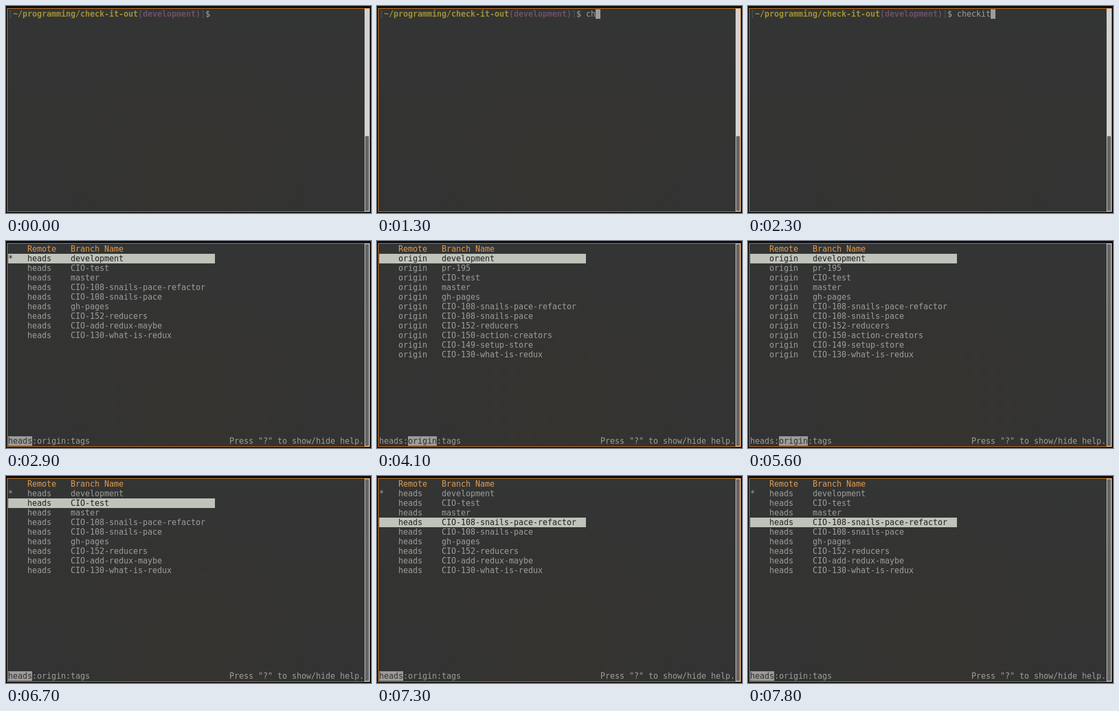
These frames come from a looping animation (683x388 px, 8 s). An HTML page with a canvas:

```html
<!DOCTYPE html>
<html lang="en">
<head>
<meta charset="utf-8">
<title>Branch picker in a terminal</title>
<style>
html, body { margin: 0; width: 100%; height: 100%; overflow: hidden; background: #0c0c0c; }
canvas { display: block; }
</style>
</head>
<body>
<canvas id="stage" width="683" height="388"></canvas>
<script>
const ctx = document.getElementById('stage').getContext('2d', { alpha: false });
const LOOP = 8000, LEFT = 4, TOP = 6, CELL = 9, ROW = 18;
const FONT = '15px "DejaVu Sans Mono", monospace';
const TEXT = '#9d9d9a', DIM = '#4d5454', BAR = '#c0c3ba', INK = '#1f2020';

const COMMAND = 'checkit';
const KEYS = [1100, 1300, 1500, 1600, 1900, 2100, 2300];

const LISTS = {
  heads: ['development', 'CIO-test', 'master', 'CIO-108-snails-pace-refactor',
    'CIO-108-snails-pace', 'gh-pages', 'CIO-152-reducers', 'CIO-add-redux-maybe',
    'CIO-130-what-is-redux'],
  origin: ['development', 'pr-195', 'CIO-test', 'master', 'gh-pages',
    'CIO-108-snails-pace-refactor', 'CIO-108-snails-pace', 'CIO-152-reducers',
    'CIO-150-action-creators', 'CIO-149-setup-store', 'CIO-130-what-is-redux'],
  tags: ['v0.1.0', 'v0.2.0']
};

// start time, open list, selected row
const VIEWS = [
  [2900, 'heads', 0], [4100, 'origin', 0], [4800, 'tags', 0], [5600, 'origin', 0],
  [6200, 'heads', 0], [6700, 'heads', 1], [7000, 'heads', 2], [7300, 'heads', 3],
  [7500, 'heads', 4], [7800, 'heads', 3]
];

function rect(x, y, w, h, color) {
  ctx.fillStyle = color;
  ctx.fillRect(x, y, w, h);
}

function block(col, row, cols, color) {
  rect(LEFT + col * CELL, TOP + row * ROW, cols * CELL, ROW, color);
}

function write(str, col, row, color, bold) {
  ctx.font = (bold ? 'bold ' : '') + FONT;
  ctx.fillStyle = color;
  [...str].forEach((ch, i) => ctx.fillText(ch, LEFT + (col + i) * CELL, TOP + row * ROW + 14));
  return col + str.length;
}

function drawWindow(thumbTop) {
  rect(0, 0, 683, 388, '#0c0c0c');
  rect(2, 4, 679, 382, '#e58424');
  const shade = ctx.createLinearGradient(0, 5, 0, 385);
  shade.addColorStop(0, '#333534');
  shade.addColorStop(0.5, '#333332');
  shade.addColorStop(1, '#323332');
  rect(3, 5, 677, 380, shade);
  const glow = ctx.createRadialGradient(345, 310, 20, 345, 310, 240);
  glow.addColorStop(0, 'rgba(56,52,46,.6)');
  glow.addColorStop(1, 'rgba(56,52,46,0)');
  rect(3, 5, 668, 380, glow);

  rect(671, 5, 9, 380, '#d2d2d0');
  ctx.fillStyle = '#666664';
  ctx.beginPath();
  ctx.roundRect(672, thumbTop, 7, 384 - thumbTop, 1);
  ctx.fill();
}

function drawPrompt(t) {
  let col = write('[', 0, 0, DIM);
  col = write('~/programming/check-it-out', col, 0, '#9f8f35', true);
  col = write('(development)', col, 0, '#6d4f6b', true);
  col = write(']', col, 0, DIM);
  col = write('$', col, 0, '#aaa996') + 1;
  const typed = KEYS.filter(k => t >= k).length;
  col = write(COMMAND.slice(0, typed), col, 0, TEXT);
  if (typed || (t >= 100 && t < 700)) block(col, 0, 1, '#9c9c9b');
}

function drawPicker(name, selected) {
  const list = LISTS[name];
  const width = 15 + Math.max(...list.map(s => s.length));
  write('Remote', 4, 0, '#e39b4f');
  write('Branch Name', 13, 0, '#e39b4f');
  list.forEach((branch, i) => {
    const color = i === selected ? INK : TEXT;
    if (i === selected) block(0, i + 1, width, BAR);
    if (name === 'heads' && i === 0) write('*', 0, 1, color);
    write(name, 4, i + 1, color);
    write(branch, 13, i + 1, color);
  });

  let col = 0;
  Object.keys(LISTS).forEach((tab, i) => {
    if (i) col = write(':', col, 20, TEXT);
    if (tab === name) block(col, 20, tab.length, '#9c9c9a');
    col = write(tab, col, 20, tab === name ? '#303130' : TEXT);
  });
  write('Press "?" to show/hide help.', 46, 20, TEXT);
}

function draw(t) {
  const view = VIEWS.filter(v => t >= v[0]).pop();
  drawWindow(view ? 6 : 244);
  if (view) drawPicker(view[1], view[2]);
  else drawPrompt(t);
}

let start;
function tick(now) {
  if (start === undefined) start = now;
  draw((now - start) % LOOP);
  requestAnimationFrame(tick);
}
draw(0);
requestAnimationFrame(tick);
</script>
</body>
</html>
```
